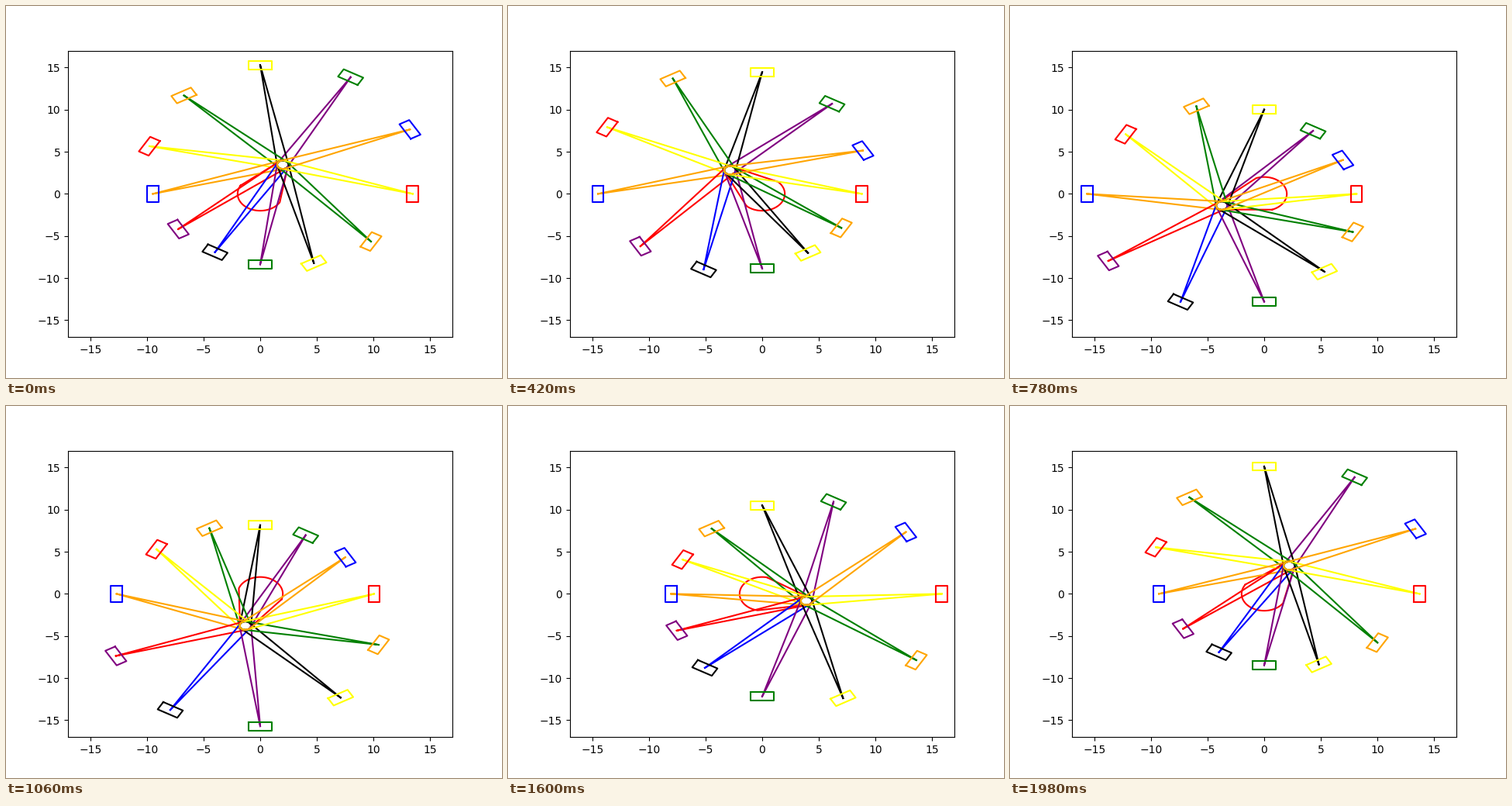
Write a matplotlib script that moves like this. It is 640 px wide and 480 px high and loops after 2000 ms.

```python
import numpy as np
import matplotlib.pyplot as plt
from matplotlib.animation import FuncAnimation

FRAMES = 100
CYLINDERS = 12
CRANK, ROD = 4, 12          # crank throw and rod length
HUB, PIN = 2, 0.5           # radii of the hub and the crank pin
START = np.pi / 3
PALETTE = ["red", "blue", "purple", "black", "green", "yellow", "orange"]

# complex numbers stand for points in the plane
PISTON = np.array([-0.5 - 1j, 0.5 - 1j, 0.5 + 1j, -0.5 + 1j, -0.5 - 1j])
HALF_TURN = np.exp(1j * np.linspace(np.pi / 2, 3 * np.pi / 2, 40))

fig, ax = plt.subplots(figsize=(6.4, 4.8), dpi=100)
ax.set_xlim(-17, 17)
ax.set_ylim(-17, 17)


def new_line(index):
    return ax.plot([], [], color=PALETTE[index % len(PALETTE)], lw=1.5)[0]


def put(line, points):
    line.set_data(points.real, points.imag)


crank = new_line(0)
axes_dirs = np.exp(1j * (START + 2 * np.pi * np.arange(CYLINDERS) / CYLINDERS))
rods = [new_line(i + 2) for i in range(CYLINDERS)]
pistons = [new_line(i + 4) for i in range(CYLINDERS)]


def update(frame):
    turn = np.exp(1j * (START + 2 * np.pi * frame / FRAMES))
    pin = CRANK * turn
    web = np.concatenate([HUB * HALF_TURN, CRANK - PIN * HALF_TURN,
                          HUB * HALF_TURN[:1]])
    put(crank, web * turn)

    for axis, rod, piston in zip(axes_dirs, rods, pistons):
        local = pin * axis.conjugate()
        reach = local.real + np.sqrt(ROD**2 - local.imag**2)
        head = reach * axis
        along = (head - pin) / ROD
        big_end = pin + PIN * HALF_TURN * along
        put(rod, np.concatenate([[head], big_end, [head]]))
        put(piston, head + PISTON * axis)
    return [crank, *rods, *pistons]


anim = FuncAnimation(fig, update, frames=FRAMES, interval=20,
                     repeat=True, repeat_delay=0)
plt.show()
```
